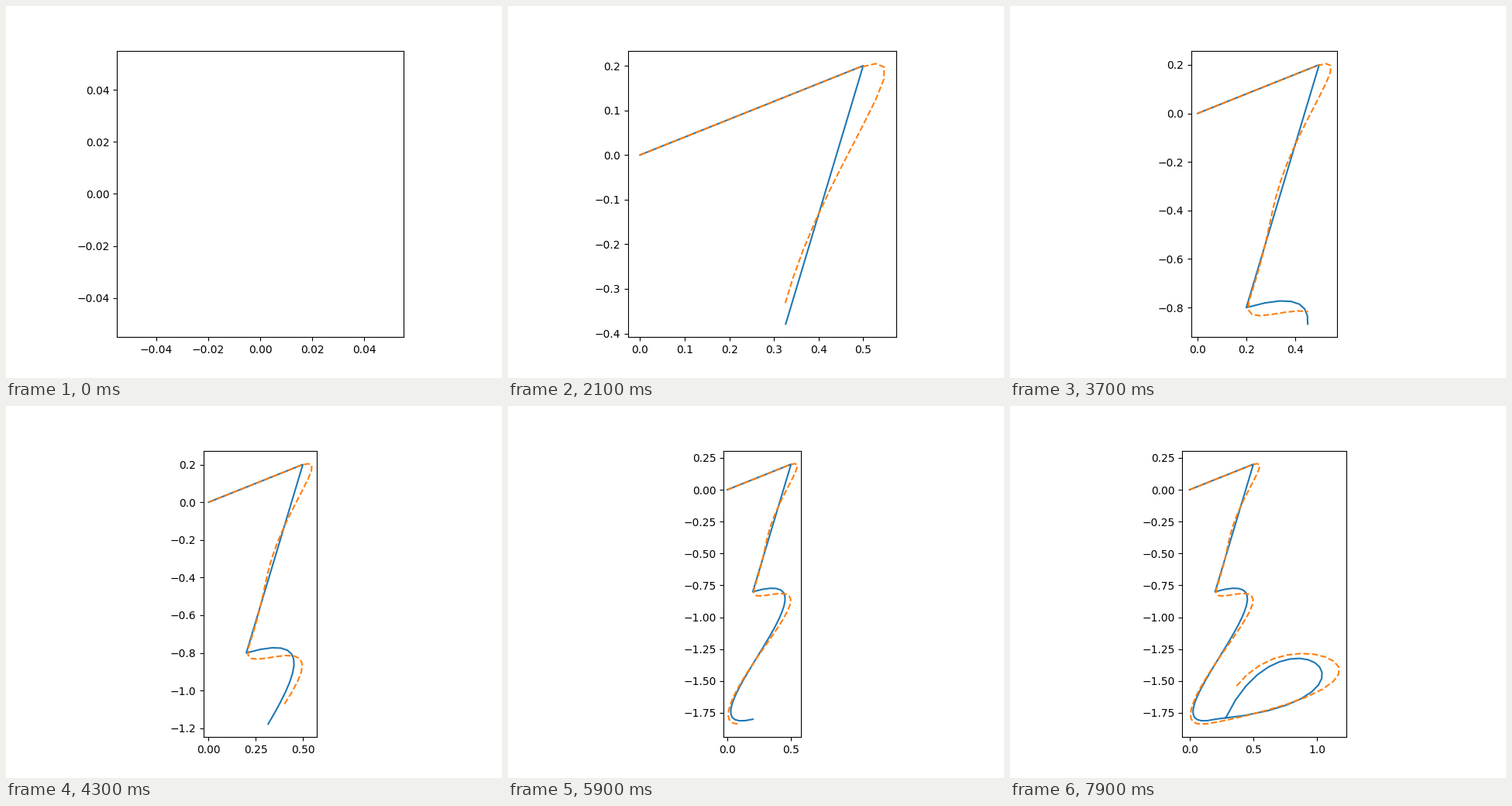
A matplotlib script for the animation above (8000 ms loop, 640 by 480 pixels).

```python
import numpy as np
import matplotlib.pyplot as plt
from matplotlib.animation import FuncAnimation

FRAMES = 80


def bezier(n, *points):
    """n points on a Bezier curve of any degree (de Casteljau)."""
    t = np.linspace(0, 1, n)[:, None]
    p = [np.array(q) for q in points]
    while len(p) > 1:
        p = [(1 - t) * a + t * b for a, b in zip(p, p[1:])]
    return p[0]


def follow(ref):
    """Underdamped second-order tracker, at rest on the first point."""
    r = np.vstack([ref[:1], ref[:1], ref])
    out = r.copy()
    for k in range(2, len(r)):
        out[k] = (1.54 * out[k - 1] - 0.71 * out[k - 2]
                  + 0.145 * r[k] - 0.035 * r[k - 1] + 0.06 * r[k - 2])
    return out[2:]


start, peak, notch, foot = (0, 0), (0.5, 0.2), (0.2, -0.8), (0.2, -1.8)
path = np.vstack([
    bezier(10, start, peak),
    bezier(20, peak, notch),
    bezier(30, notch, (1.015, -0.56), (-0.455, -1.96), foot),
    bezier(20, foot, (1.772, -1.652), (0.741, -0.81), (0.283, -1.79)),
])
track = follow(path)

fig, ax = plt.subplots(figsize=(6.4, 4.8), dpi=100)


def draw(i):
    ax.cla()
    ax.set_aspect("equal")
    ax.plot(*path[:i + 1].T, color="C0")
    ax.plot(*track[:i + 1].T, "--", color="C1")
    return ax.lines


anim = FuncAnimation(fig, draw, frames=FRAMES, interval=100,
                     repeat=True, repeat_delay=0)
plt.show()
```
